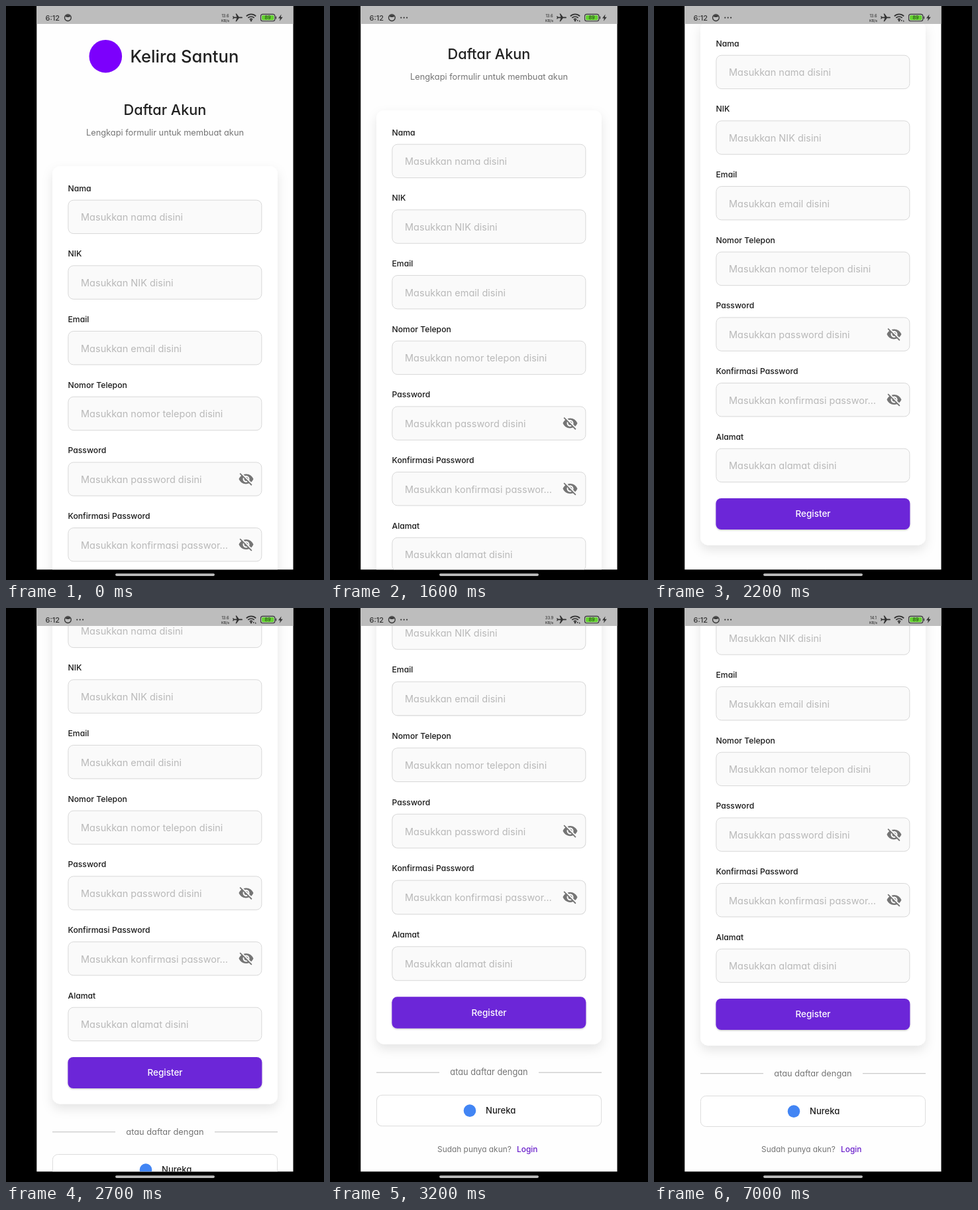
An HTML page that plays this animation: 480x864 px, repeating every 7500 ms.

```html
<!DOCTYPE html>
<html lang="id">
<head>
<meta charset="utf-8">
<title>Daftar Akun</title>
<style>
  html, body { margin: 0; width: 100%; height: 100%; overflow: hidden; background: #000; }
  svg { display: block; width: 480px; height: 864px; }
  text { font-family: Inter, Lato, sans-serif; font-feature-settings: "cv11"; white-space: pre; }
</style>
</head>
<body>
<svg id="stage" viewBox="0 0 480 864" xmlns="http://www.w3.org/2000/svg">
  <defs>
    <clipPath id="view"><rect x="46.3" y="27" width="387.2" height="821.3"/></clipPath>
    <filter id="soft" x="-15%" y="-10%" width="130%" height="120%">
      <feDropShadow dx="0" dy="7" stdDeviation="8" flood-color="#000" flood-opacity=".1"/>
    </filter>
    <filter id="lift" x="-5%" y="-20%" width="110%" height="150%">
      <feDropShadow dx="0" dy="1.2" stdDeviation="1.1" flood-color="#000" flood-opacity=".22"/>
    </filter>
  </defs>
</svg>
<script>
const LOOP = 7500, TICK = 100, BOTTOM = 848.3;
const stage = document.getElementById('stage');

function el(tag, attrs, parent = stage) {
  const node = document.createElementNS('http://www.w3.org/2000/svg', tag);
  for (const key in attrs) node.setAttribute(key, attrs[key]);
  parent.appendChild(node);
  return node;
}

function box(x, y, width, height, rx, attrs, parent) {
  return el('rect', { x, y, width, height, rx, ...attrs }, parent);
}

function label(str, x, y, size, fill, parent, weight = 400, anchor = 'start') {
  const node = el('text', {
    x, y, fill, 'font-size': size, 'font-weight': weight, 'text-anchor': anchor
  }, parent);
  node.textContent = str;
  return node;
}

const EYE_OFF = 'M12 7c2.76 0 5 2.24 5 5 0 .65-.13 1.26-.36 1.83l2.92 2.92' +
  'c1.51-1.26 2.7-2.89 3.43-4.75-1.73-4.39-6-7.5-11-7.5-1.4 0-2.74.25-3.98.7l2.16 2.16' +
  'C10.74 7.13 11.35 7 12 7zM2 4.27l2.28 2.28.46.46C3.08 8.3 1.78 10.02 1 12' +
  'c1.73 4.39 6 7.5 11 7.5 1.55 0 3.03-.3 4.38-.84l.42.42L19.73 22 21 20.73 3.27 3z' +
  'M7.53 9.8l1.55 1.55c-.05.21-.08.43-.08.65 0 1.66 1.34 3 3 3 .22 0 .44-.03.65-.08' +
  'l1.55 1.55c-.67.33-1.41.53-2.2.53-2.76 0-5-2.24-5-5 0-.79.2-1.53.53-2.2z' +
  'm4.31-.78l3.15 3.15.02-.16c0-1.66-1.34-3-3-3z';
const PLANE = 'M21 16v-2l-8-5V3.5c0-.83-.67-1.5-1.5-1.5S10 2.67 10 3.5V9l-8 5v2l8-2.5V19' +
  'l-2 1.5V22l3.5-1 3.5 1v-1.5L13 19v-5.5z';

// Page
box(46.3, 0, 387.2, BOTTOM, 0, { fill: '#fefefe' });
const page = el('g', {}, el('g', { 'clip-path': 'url(#view)' }));

el('circle', { cx: 150.3, cy: 75.7, r: 24.8, fill: '#7c00fc' }, page);
label('Kelira Santun', 187.5, 84.5, 25.6, '#212121', page, 500);
label('Daftar Akun', 240, 163.7, 21.7, '#212121', page, 500, 'middle');
label('Lengkapi formulir untuk membuat akun', 240, 195.3, 12.8, '#757575', page, 400, 'middle');

box(70, 241, 340, 788.5, 12, { fill: '#fff', filter: 'url(#soft)' }, page);

const fields = [
  ['Nama', 'nama disini'],
  ['NIK', 'NIK disini'],
  ['Email', 'email disini'],
  ['Nomor Telepon', 'nomor telepon disini'],
  ['Password', 'password disini', true],
  ['Konfirmasi Password', 'konfirmasi passwor…', true],
  ['Alamat', 'alamat disini']
];
fields.forEach(([name, hint, secret], i) => {
  const y = 292.2 + i * 98.67;
  label(name, 93.5, y - 13.6, 12.2, '#1a1a1a', page, 450);
  box(93.9, y, 292, 50.4, 8, { fill: '#fafafa', stroke: '#d8d8d8' }, page);
  label('Masukkan ' + hint, 113, y + 31, 14.5, '#b9b9b9', page);
  if (secret) {
    el('path', { d: EYE_OFF, fill: '#757575', transform: `translate(350.5 ${y + 13})` }, page);
  }
});

box(93.4, 959, 293, 47, 8, { fill: '#6c25d8', filter: 'url(#lift)' }, page);
label('Register', 240, 987.4, 13.5, '#fff', page, 500, 'middle');

for (const x of [70, 315]) box(x, 1071.2, 95, 1, 0, { fill: '#bdbdbd' }, page);
label('atau daftar dengan', 240, 1075.6, 12.8, '#757575', page, 400, 'middle');

box(70.4, 1105.5, 339.2, 46, 8, { fill: '#fff', stroke: '#dcdcdc' }, page);
el('circle', { cx: 211, cy: 1128.6, r: 9.3, fill: '#4285f4' }, page);
label('Nureka', 235, 1133.4, 13.1, '#1f1f1f', page, 500);

label('Sudah punya akun?', 162, 1190.3, 11.9, '#757575', page);
label('Login', 282, 1190.3, 11.9, '#6a1fcb', page, 500);

// Status bar
const INK = '#333';
box(46.3, 0, 387.2, 27, 0, { fill: '#bdbdbd' });
label('6:12', 59.5, 22, 11, INK, stage, 500);
el('circle', { cx: 93.4, cy: 17.6, r: 4.9, fill: 'none', stroke: INK, 'stroke-width': 1.3 });
el('path', { d: 'M89.5 16 A4.3 4.3 0 0 1 97.3 16 Q93.4 17.6 89.5 16Z', fill: INK });

const dots = el('g', { fill: INK });
for (let i = 0; i < 3; i++) el('circle', { cx: 107.3 + i * 4.4, cy: 17.6, r: 1.1 }, dots);

const rate = label('', 331, 17.3, 5.8, INK, stage, 500, 'middle');
label('KB/s', 331, 23.8, 5.4, INK, stage, 500, 'middle');
el('path', { d: PLANE, fill: INK, transform: 'translate(349.5 17.4) rotate(90) scale(.62 .74) translate(-11.5 -12)' });

for (const r of [3, 6.6, 10.2]) {
  const d = r * Math.SQRT1_2;
  el('path', {
    d: `M${370 - d} ${22.6 - d} A${r} ${r} 0 0 1 ${370 + d} ${22.6 - d}`,
    fill: 'none', stroke: INK, 'stroke-width': 1.7
  });
}
el('circle', { cx: 370, cy: 22, r: 1.4, fill: INK });
const traffic = el('path', { d: 'M372.6 21h2.2l-1.1 2.6zM375.6 23.6h2.2l-1.1-2.6z', fill: INK });

box(384.5, 12.4, 21.4, 10.4, 3, { fill: 'none', stroke: INK, 'stroke-width': 1.1 });
box(386.1, 14, 18.2, 7.2, 1.6, { fill: '#63d22f' });
box(406.8, 15.6, 1.3, 4, 0.6, { fill: INK });
label('89', 395, 20.2, 7.2, '#2c4a20', stage, 500, 'middle');
el('path', { d: 'M415.6 12.6l-4.6 5.8h2.9l-.9 4.4 4.8-6h-3z', fill: INK });

// Home indicator
box(165, 854.3, 150, 3.6, 1.8, { fill: '#bcbcbc' });

// Keys: [time, value, slope per ms]
const SCROLL = [
  [840, 0, 0], [1600, 84, .21], [2200, 218, .2], [2700, 283, 0],
  [2830, 283, 0], [3100, 371, .4]
];
const STRETCH = [[3070, 0, 0], [3200, .0104, 0], [3650, 0, 0]];

function curve(keys, t) {
  if (t <= keys[0][0]) return keys[0][1];
  for (let i = 1; i < keys.length; i++) {
    const [t0, a, va] = keys[i - 1], [t1, b, vb] = keys[i];
    if (t > t1) continue;
    const h = t1 - t0, u = (t - t0) / h, w = 1 - u;
    return w * w * (1 + 2 * u) * a + u * u * (3 - 2 * u) * b + h * u * w * (w * va - u * vb);
  }
  return keys[keys.length - 1][1];
}

function draw(t) {
  const y = curve(SCROLL, t), k = 1 + curve(STRETCH, t);
  // Overscroll stretches the view from its bottom edge.
  page.setAttribute('transform', `translate(0 ${BOTTOM - k * (BOTTOM + y)}) scale(1 ${k})`);
  dots.setAttribute('opacity', Math.min(1, t / 300));
  traffic.setAttribute('opacity', t >= 100 && t < 7000 ? 1 : 0);
  rate.textContent = t < 3000 ? '13.6' : t < 7000 ? '33.9' : '14.1';
}

function frame() {
  draw(Math.floor(performance.now() % LOOP / TICK) * TICK);
  requestAnimationFrame(frame);
}
frame();
</script>
</body>
</html>
```
